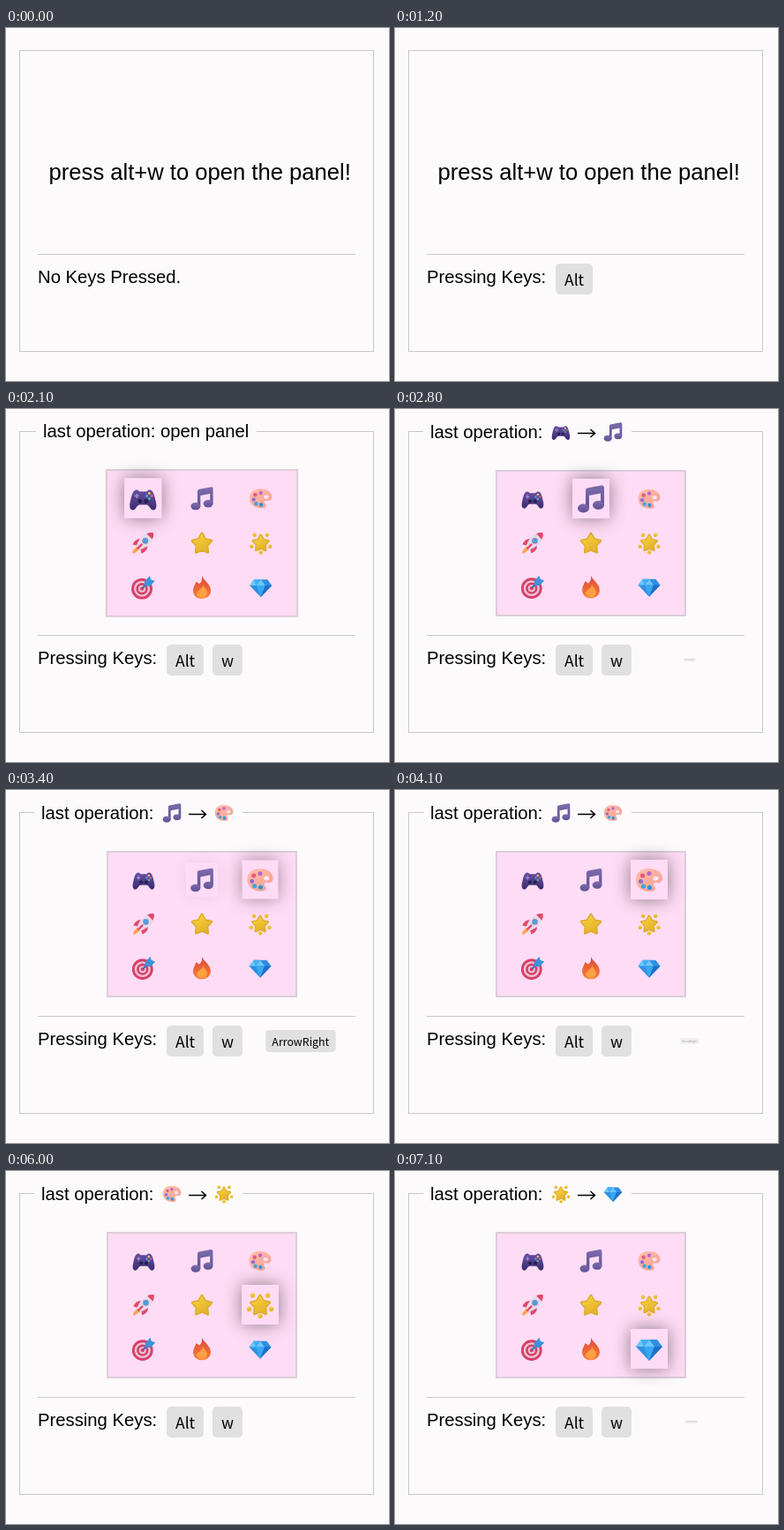
These frames come from a looping animation (434x400 px, 8000 ms). An HTML page:

```html
<!DOCTYPE html>
<html lang="en">
<head>
<meta charset="utf-8">
<title>Key panel</title>
<style>
  html, body { margin: 0; width: 100%; height: 100%; overflow: hidden; background: #fcfafb; }
  body { position: relative; font: 20.27px/24px "Liberation Sans", Arial, sans-serif; color: #000; }
  div, svg { position: absolute; box-sizing: border-box; white-space: pre; }
  #card { left: 15px; top: 25px; width: 402px; height: 342px; border: 1px solid #cac7ca; }
  #rule { left: 36px; top: 256px; width: 360px; height: 1px; background: #cac7ca; }
  #hint { left: 48.6px; top: 149px; font-size: 25.6px; line-height: 28px; }
  #status { left: 36px; top: 270px; }
  .legend { padding: 0 8px; background: #fcfafb; }
  #opened { left: 34px; top: 13px; width: 250px; }
  #moved { left: 32px; top: 14px; width: 236px; height: 24px; }
  #moved svg { top: 1px; width: 22px; height: 22px; }
  #from { left: 144.5px; }
  #to { left: 203.5px; }
  #arrow { left: 174px; fill: none; stroke: #000; stroke-width: 1.5; }
  #panel { left: 114px; top: 69px; width: 216px; height: 166px; background: #ffdcf5; border: 2px solid #dccdd8; }
  .tile { width: 42px; height: 45px; background: #ffdcf5; }
  .tile svg { left: 5px; top: 7px; width: 32px; height: 32px; }
  .key { top: 267px; height: 35px; padding: 0 10px; border-radius: 5px; background: #e0e0e0;
    font: 17.5px/35px "Noto Sans CJK SC", "Noto Sans CJK JP", "Noto Sans CJK", "Noto Sans", sans-serif; }
</style>
</head>
<body>
<svg width="0" height="0" viewBox="0 0 32 32">
  <defs>
    <linearGradient id="violet" x2="0" y2="1"><stop stop-color="#6a4fa3"/><stop offset="1" stop-color="#3a2c70"/></linearGradient>
    <linearGradient id="mauve" x2="0" y2="1"><stop stop-color="#7c6cab"/><stop offset="1" stop-color="#5f5095"/></linearGradient>
    <linearGradient id="gold" x2=".6" y2="1"><stop stop-color="#fbd63f"/><stop offset="1" stop-color="#e3b02a"/></linearGradient>
    <linearGradient id="flame" x2="0" y2="1"><stop stop-color="#dc4a3c"/><stop offset="1" stop-color="#fb7c35"/></linearGradient>
    <linearGradient id="skin" x2="1" y2="1"><stop stop-color="#ffc0a8"/><stop offset="1" stop-color="#f79c93"/></linearGradient>
    <path id="star" d="M16 3L20.500 11L29 12.800L23 19.500L24 28.500L16 25L8 28.500L9 19.500L3 12.800L11.500 11Z" fill="url(#gold)" stroke="#dcab2c" stroke-width="3.500" stroke-linejoin="round" paint-order="stroke"/>
  </defs>
  <symbol id="game" viewBox="0 0 32 32">
    <path d="M9 6C5 6 3.500 11 2 18C0 25 1.500 29 4.500 29C8 29 8.500 23.500 12 23H20C23.500 23.500 24 29 27.500 29C30.500 29 32 25 30 18C28.500 11 27 6 23 6C21.500 6 21 8 19.500 8H12.500C11 8 10.500 6 9 6Z" fill="url(#violet)"/>
    <path d="M9 10.500v5M6.500 13h5" stroke="#9a8ac8" stroke-width="1.800"/>
    <g fill="#251f50"><circle cx="12.500" cy="19" r="2.400"/><circle cx="19.500" cy="19" r="2.400"/></g>
    <circle cx="23" cy="10" r="1.500" fill="#f3c74c"/><circle cx="20.300" cy="13" r="1.500" fill="#45a8e8"/>
    <circle cx="25.700" cy="13" r="1.500" fill="#ee5a77"/><circle cx="23" cy="16" r="1.500" fill="#4ac090"/>
  </symbol>
  <symbol id="music" viewBox="0 0 32 32">
    <g fill="url(#mauve)"><path d="M10 6Q10 4 12 3.500L28 .5Q31 0 31 3V23H27V9.500L14 12V27H10Z"/>
    <ellipse cx="7.500" cy="26.500" rx="6.500" ry="5"/><ellipse cx="24.500" cy="23" rx="6.500" ry="5"/></g>
  </symbol>
  <symbol id="palette" viewBox="0 0 32 32">
    <path d="M15 3C6 3 0 9 1 17C2 25 9 29 17 29C23 29 24 26 22 23.500C20 21 21 18.500 24 19C28 20 31 18 31 14C31 7 24 3 15 3Z" fill="url(#skin)"/>
    <ellipse cx="23.500" cy="14" rx="3.200" ry="2.600" fill="#ffe5ee"/>
    <circle cx="16" cy="8.500" r="2.600" fill="#b766d6"/><circle cx="8.500" cy="11" r="2.600" fill="#e9587f"/>
    <circle cx="6.500" cy="17.500" r="2.500" fill="#8d6bd4"/><circle cx="9.500" cy="23" r="2.600" fill="#3aa6e0"/><circle cx="16.500" cy="24.500" r="2.600" fill="#2f92d8"/>
  </symbol>
  <symbol id="rocket" viewBox="0 0 32 32">
    <path d="M8 20L2 27Q1 31 4 30L12 24Z" fill="#ffa04a"/>
    <path d="M12 10Q5 10 2 18L10 20ZM22 20Q22 27 14 30L12 22Z" fill="#e5476a"/>
    <path d="M30 2C20 1 11 8 7 20L12 25C24 21 31 12 30 2Z" fill="#e2dbec"/>
    <path d="M30 2Q25 1 21 3.500L28.500 11Q31 6 30 2Z" fill="#e5476a"/>
    <circle cx="19" cy="13" r="4" fill="#9485b0"/><circle cx="19" cy="13" r="2.800" fill="#39a5e8"/>
    <path d="M14 18L9 23" stroke="#e5476a" stroke-width="2.800" stroke-linecap="round"/>
  </symbol>
  <symbol id="plain" viewBox="0 0 32 32"><use href="#star"/></symbol>
  <symbol id="glow" viewBox="0 0 32 32">
    <use href="#star" transform="translate(2.900 2.500) scale(.82)"/>
    <g fill="url(#gold)"><circle cx="7.500" cy="5" r="2.700"/><circle cx="24.500" cy="5" r="2.700"/><circle cx="28.500" cy="20.500" r="2.700"/><circle cx="3.500" cy="20.500" r="2.700"/><circle cx="16" cy="28.500" r="2.700"/></g>
  </symbol>
  <symbol id="target" viewBox="0 0 32 32">
    <circle cx="14.500" cy="17.500" r="14.300" fill="#d8406a"/><circle cx="14.500" cy="17.500" r="10.800" fill="#efc6d6"/>
    <circle cx="14.500" cy="17.500" r="8" fill="#d8406a"/><circle cx="14.500" cy="17.500" r="4.800" fill="#efc6d6"/><circle cx="14.500" cy="17.500" r="2.500" fill="#d8406a"/>
    <path d="M15 17L25 7" stroke="#2f6fb8" stroke-width="2.200"/>
    <path d="M18 8L25 0L26.500 5L32 7L25 14L18 13.500Z" fill="#3c93dc"/>
  </symbol>
  <symbol id="fire" viewBox="0 0 32 32">
    <path d="M16 0C18 6 28 11 28 20C28 27 22 31 16 31C9 31 4 26 4 20C4 15 7 12 8 8Q11 9 12 11Q17 8 16 0Z" fill="url(#flame)"/>
    <path d="M18 12C18 17 24 18 23 24C22 28 19 30 16 30C12 30 9 27 9 24C9 20 17 18 18 12Z" fill="#ffa043"/>
  </symbol>
  <symbol id="gem" viewBox="0 0 32 32">
    <path d="M7 5H25L31 13L16 29L1 13Z" fill="#2f8fe2"/>
    <path d="M7 5L1 13H10ZM16 5L10 13H22Z" fill="#6cc8fa"/><path d="M7 5H16L10 13Z" fill="#46aef2"/>
    <path d="M10 13H22L16 29Z" fill="#38a8f0"/><path d="M22 13H31L16 29Z" fill="#1d6fc8"/>
  </symbol>
</svg>

<div id="card"></div>
<div id="rule"></div>
<div id="hint">press alt+w to open the panel!</div>
<div id="opened" class="legend">last operation: open panel</div>
<div id="moved" class="legend">last operation:<svg id="from"><use/></svg><svg id="arrow"><path d="M1 12.500H20.500M15.500 8L20.500 12.500L15.500 17"/></svg><svg id="to"><use/></svg></div>
<div id="panel"></div>
<div id="status"></div>

<script>
  const LOOP = 8000, OPEN = 1800, REST = 7100;
  const icons = ["game", "music", "palette", "rocket", "plain", "glow", "target", "fire", "gem"];
  // Time of each selection and the tile it lands on.
  const moves = [[OPEN, 0], [2400, 1], [3300, 2], [4800, 5], [6200, 8]];
  // Label, left edge, press time, release time.
  const presses = [
    ["Alt", 182, 100, LOOP * 2], ["w", 234, OPEN, LOOP * 2],
    ["ArrowRight", 278, 2400, 2700], ["ArrowRight", 278, 3300, 4017],
    ["ArrowDown", 278, 4800, 5250], ["ArrowDown", 278, 6200, 7000]
  ];

  const $ = id => document.getElementById(id);
  const part = (t, start, length) => Math.min(1, Math.max(0, (t - start) / length));
  const easeOut = u => 1 - (1 - u) ** 3;
  const back = (u, s) => 1 + (s + 1) * (u - 1) ** 3 + s * (u - 1) ** 2;
  const show = (el, on) => { el.style.visibility = on ? "visible" : "hidden"; };
  const setIcon = (id, name) => $(id).firstElementChild.setAttribute("href", "#" + name);

  function add(parent, className, left) {
    const el = document.createElement("div");
    el.className = className;
    el.style.left = left + "px";
    parent.append(el);
    return el;
  }

  const tiles = icons.map((name, i) => {
    const el = add($("panel"), "tile", 19 + (i % 3) * 66);
    el.style.top = 7.7 + Math.floor(i / 3) * 50.3 + "px";
    el.innerHTML = `<svg><use href="#${name}"/></svg>`;
    return el;
  });

  const keys = presses.map(([label, left]) => {
    const el = add(document.body, "key", left);
    el.textContent = label;
    return el;
  });

  function drawKey(el, t, down, up) {
    const leave = part(Math.min(t, REST), up, 250);
    const scale = easeOut(part(t, down, 300)) * (1 - leave) ** 4;
    show(el, t >= down && scale > 0);
    el.style.transform = `scale(${scale})`;
    el.style.opacity = (1 - leave) ** 2.5;
  }

  function drawTile(el, i, t) {
    let lift = 0;
    moves.forEach(([start, tile], n) => {
      if (tile !== i) return;
      const next = moves[n + 1];
      lift = easeOut(part(t, start, 220)) * (1 - (next ? easeOut(part(t, next[0], 220)) : 0));
    });
    el.style.transform = `scale(${0.83 + 0.17 * lift})`;
    el.style.boxShadow = `0 0 20px rgba(0,0,0,${0.45 * lift})`;
    el.style.zIndex = lift > 0 ? 1 : 0;
  }

  function draw(t) {
    const open = t >= OPEN;
    const step = moves.filter(([start]) => t >= start).length - 1;

    $("hint").style.opacity = 1 - part(t, OPEN, 150);
    $("status").textContent = t < presses[0][2] ? "No Keys Pressed." : "Pressing Keys:";

    show($("panel"), open);
    const grow = part(t, OPEN, 500);
    $("panel").style.transform = `scale(${back(grow, 0.77)})`;
    $("panel").style.opacity = part(t, OPEN, 200);

    show($("opened"), step === 0);
    const drop = easeOut(part(t, OPEN, 250));
    $("opened").style.transform = `translateY(${-12 * (1 - drop)}px)`;
    $("opened").style.opacity = drop;

    show($("moved"), step > 0);
    if (step > 0) {
      setIcon("from", icons[moves[step - 1][1]]);
      setIcon("to", icons[moves[step][1]]);
    }

    tiles.forEach((el, i) => drawTile(el, i, t));
    keys.forEach((el, i) => drawKey(el, t, presses[i][2], presses[i][3]));
  }

  const begin = performance.now();
  function tick() {
    draw((performance.now() - begin) % LOOP);
    requestAnimationFrame(tick);
  }
  tick();
</script>
</body>
</html>
```
